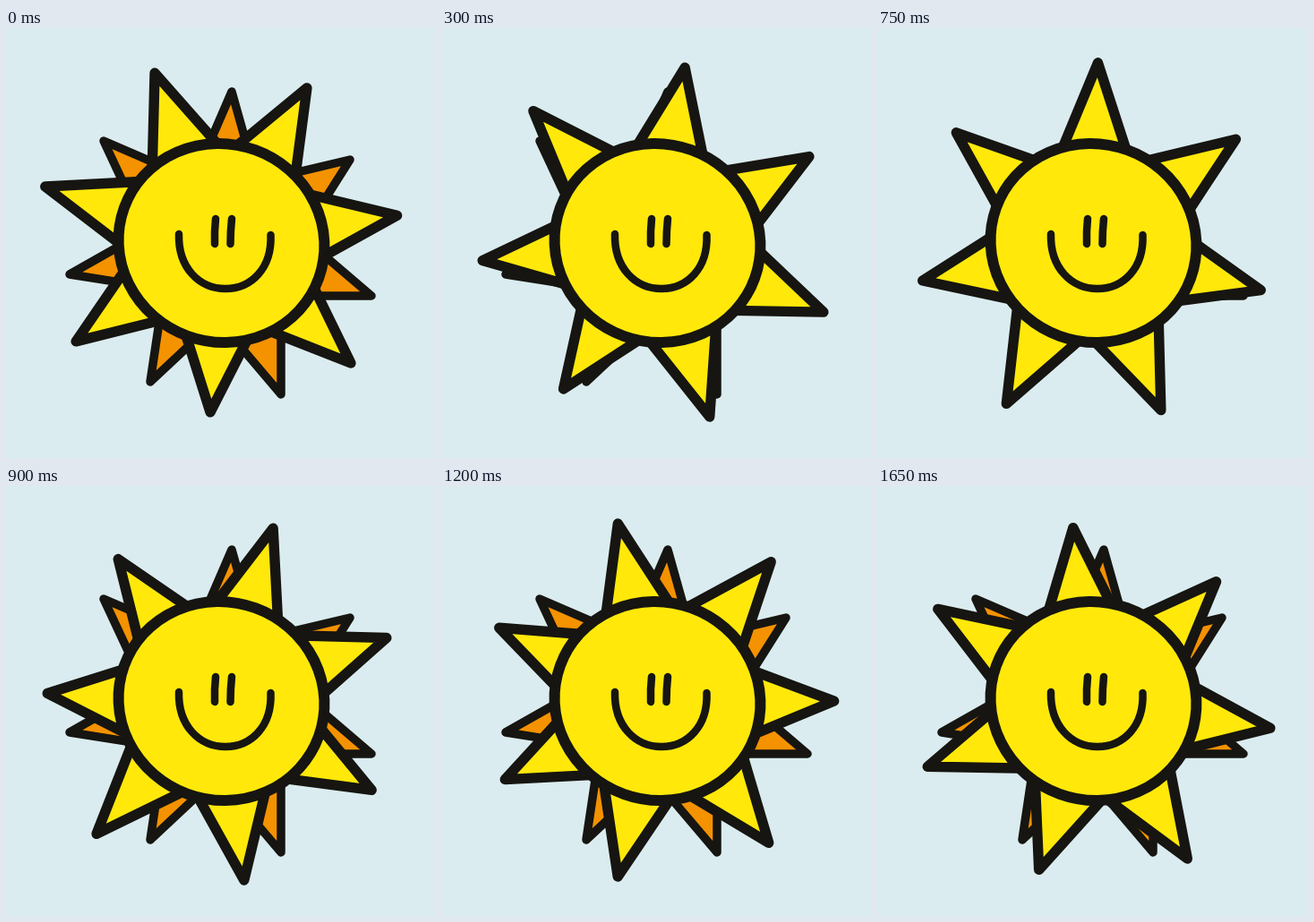
These frames come from a looping animation (480 by 480 pixels, 1800 ms). An HTML page with a canvas:

```html
<!DOCTYPE html>
<html lang="en">
<head>
<meta charset="utf-8">
<title>Smiling sun</title>
<style>
  html, body { margin: 0; height: 100%; overflow: hidden; background: #daecef; }
  canvas { display: block; }
</style>
</head>
<body>
<canvas id="stage" width="480" height="480"></canvas>
<script>
const ctx = document.getElementById('stage').getContext('2d');
const INK = '#161511', YELLOW = '#ffe80a', ORANGE = '#f49200';
const STEP_MS = 150, TURN = 15, LAST = 6;
const rad = deg => deg * Math.PI / 180;

// Front rays: tip angle, tip radius, directions of the two sides (degrees)
const frontRays = [
  [248.6, 200.2, 91.5, 48.5],
  [299.7, 195.4, 140.5, 97.5],
  [352.1, 199.3, 193.5, 151],
  [43.3, 200.3, 244, 201.5],
  [93.3, 192.5, 252.5, 297],
  [144.9, 196.8, 304.5, 346],
  [197, 204.3, 37.5, -3]
];

// Back rays: tip, then one point on each side
const backRays = [
  [252, 71, 230, 122, 268, 128],
  [384, 147, 325, 161, 353, 196],
  [408, 299, 360, 258, 348, 299],
  [307, 409, 307, 345, 262, 356],
  [161, 395, 170, 335, 207, 352],
  [71, 275, 124, 245, 128, 284],
  [109, 126, 160, 148, 137, 186]
];

// The ring of front rays wobbles a little as it turns
const centers = [
  [239.1, 236.7], [240.1, 245.6], [241.2, 242.1], [242, 240.2],
  [242.3, 241.1], [238.3, 243], [238.4, 242.6]
];

function paint(path, width, fill) {
  if (fill) {
    ctx.fillStyle = fill;
    ctx.fill(path);
  }
  ctx.lineWidth = width;
  ctx.stroke(path);
}

function triangle(...points) {
  const path = new Path2D();
  points.forEach(([x, y]) => path.lineTo(x, y));
  path.closePath();
  return path;
}

const polar = (x, y, angle, length) =>
  [x + length * Math.cos(rad(angle)), y + length * Math.sin(rad(angle))];

const backShapes = backRays.map(([x, y, ax, ay, bx, by]) => {
  const extend = (px, py) => [x + (px - x) * 1.4, y + (py - y) * 1.4];
  return triangle([x, y], extend(ax, ay), extend(bx, by));
});

const face = new Path2D();
face.ellipse(240.5, 240, 115.5, 110.5, rad(20), 0, 2 * Math.PI);
const features = new Path2D(
  'M234 213Q232.5 227 233 241M252 213Q250.5 227 250.5 241' +
  'M193 230C192 268 216 291 245 291S297 268 295.500 231');

function draw(pose) {
  ctx.fillStyle = '#daecef';
  ctx.fillRect(0, 0, 480, 480);
  ctx.strokeStyle = INK;
  ctx.lineCap = ctx.lineJoin = 'round';

  backShapes.forEach(shape => paint(shape, 9.5, ORANGE));

  const turn = pose * TURN;
  const [cx, cy] = centers[pose];
  for (const [angle, radius, sideA, sideB] of frontRays) {
    const tip = polar(cx, cy, angle + turn, radius);
    const ray = triangle(tip, polar(...tip, sideA + turn, 115), polar(...tip, sideB + turn, 115));
    paint(ray, 11.4, YELLOW);
  }

  paint(face, 12, YELLOW);
  paint(features, 8.5);
}

function tick() {
  const step = Math.floor(performance.now() / STEP_MS) % (2 * LAST);
  draw(LAST - Math.abs(LAST - step));
  requestAnimationFrame(tick);
}
tick();
</script>
</body>
</html>
```
